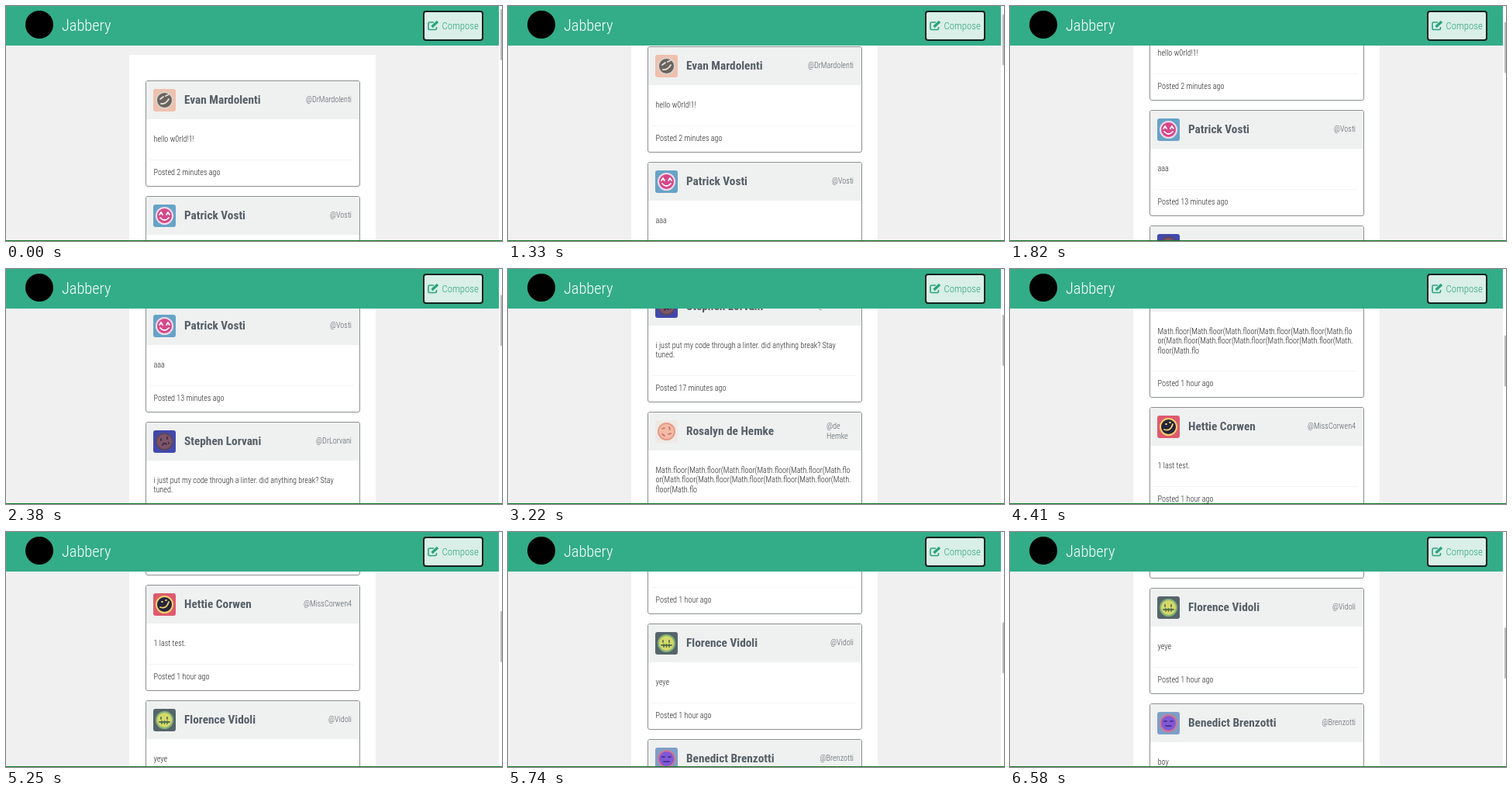
Recreate the animation shown at these times as an HTML page. Size 640 px wide and 303 px high, loop 6.79 s.

```html
<!DOCTYPE html>
<html lang="en">
<head>
<meta charset="utf-8">
<title>Jabbery</title>
<style>
  * { box-sizing: border-box; }
  html, body { margin: 0; width: 100%; height: 100%; overflow: hidden; }
  body {
    position: relative; background: #fff; color: #222;
    font: 300 10.2px/12.25px "Roboto Condensed", Roboto, sans-serif;
    font-stretch: condensed; white-space: pre;
  }
  .wide * { letter-spacing: -.055em; }
  body > *, .card > *, #bar > * { position: absolute; }
  #page { left: 0; top: 0; width: 636px; height: 302px; background: #f0f0f0; overflow: hidden; }
  #feed { position: absolute; left: 159px; top: 63px; width: 318px; height: 1300px; background: #fff; }
  .card {
    position: absolute; left: 21px; width: 277px;
    border: 1px solid #8b9092; border-radius: 3px; overflow: hidden;
  }
  .head {
    left: 0; top: 0; width: 100%; height: 49px; padding: 0 10px 0 9px;
    background: #eff0f0; color: #545f66; display: flex; align-items: center;
  }
  .head svg { width: 29px; height: 29px; margin-right: 11px; }
  .head b { font-size: 15.3px; font-weight: 700; }
  .handle { margin-left: auto; }
  .two { width: 35px; }
  .text, .time { left: 9.5px; }
  .text { top: 69px; }
  .rule { left: 4px; width: 264px; height: 1px; background: #f4f4f4; }
  #bar { left: 0; top: 0; width: 636px; height: 51px; background: #33ad87; }
  #logo { left: 25px; top: 6px; width: 36px; height: 36px; border-radius: 50%; background: #000; }
  #brand { left: 72px; top: 13px; font-size: 20.4px; line-height: 25px; color: #fff; }
  #compose {
    left: 538px; top: 6px; width: 78px; height: 39px; border: 2px solid #14211d;
    border-radius: 4px; background: #d9efe7; color: #2aa37d;
    font-size: 12.8px; line-height: 35px; padding-left: 22.5px;
  }
  #compose svg { position: absolute; left: 4px; top: 10px; }
  #thumb { left: 638px; top: 4px; width: 2px; height: 66px; border-radius: 1px; background: #b9b9b9; }
  #foot { left: 0; top: 302px; width: 640px; height: 1px; background: #0c7a22; }
</style>
</head>
<body>
<div id="page"><div id="feed"></div></div>
<div id="bar">
  <div id="logo"></div>
  <div id="brand">Jabbery</div>
  <div id="compose"><svg width="16" height="14" fill="none" stroke="#2aa37d"><path d="M8 3H2.5Q1 3 1 4.5V11Q1 12.5 2.5 12.5H10Q11.5 12.5 11.5 11V9" stroke-width="1.6"/><path d="M5.5 9L13 2" stroke-width="3.4"/></svg>Compose</div>
</div>
<div id="thumb"></div>
<div id="foot"></div>
<script>
const LOOP = 6790, STEP = 70;
const math = 'Math.floor('.repeat(5);

// name, handle, text, age, avatar [background, ring, face, ink, features]
const posts = [
  ['Evan Mardolenti', '@DrMardolenti', 'hello w0rld!1!', '2 minutes',
    ['#efc0ac', '#ddd0c8', '#69645f', '#e9ddd4', 'M9 13l4 -3M16 9l4 -2M10 19q6 1 10 -6']],
  ['Patrick Vosti', '@Vosti', 'aaa', '13 minutes',
    ['#67a3c8', '#f0dbe6', '#d6488a', '#fff', 'M8 13l2 -3l2 3M17 13l2 -3l2 3M9 17q5.5 6 11 0']],
  ['Stephen Lorvani', '@DrLorvani', 'i just put my code through a linter. did anything break? Stay\ntuned.', '17 minutes',
    ['#4149ae', '#594762', '#805466', '#352c4c', 'M10 11v2M18 9v2M12 19q2 -4 5 -1M20 16v1']],
  ['Rosalyn de Hemke', '@de\nHemke', `${math}Math.flo\nor(${math}Math.\nfloor(Math.flo`, '1 hour',
    ['#eee9e5', '#e79a88', '#f2bca4', '#cf6b70', 'M9 11l3 -1M18 9l1 3M9 18l3 2M17 18l3 -1']],
  ['Hettie Corwen', '@MissCorwen4', '1 last test.', '1 hour',
    ['#df5a6e', '#efd36a', '#25243c', '#efd36a', 'M9 18q8 3 11 -7M11 11h1M16 9h1']],
  ['Florence Vidoli', '@Vidoli', 'yeye', '1 hour',
    ['#55656b', '#83b375', '#d5d969', '#58724f', 'M10 11v2M18 11v2M8 17h13M11 16v3M14.5 16v3M18 16v3']],
  ['Benedict Brenzotti', '@Brenzotti', 'boy', '1 hour',
    ['#7d9fc9', '#d4758f', '#8058d6', '#4a358e', 'M9 12h3M17 12h3M11 18h7']]
];

const avatar = ([bg, ring, face, ink, d]) => `<svg viewBox="0 0 29 29" fill="none">
  <rect width="29" height="29" rx="3" fill="${bg}"/>
  <circle cx="14.5" cy="14.5" r="10.5" fill="${face}" stroke="${ring}" stroke-width="2"/>
  <path d="${d}" stroke="${ink}" stroke-width="1.8" stroke-linecap="round"/></svg>`;

const feed = document.getElementById('feed');
const thumb = document.getElementById('thumb');
let cardTop = 33, html = '';
for (const [name, handle, text, age, look] of posts) {
  const extra = 12 * (text.split('\n').length - 1);
  const two = handle.includes('\n') ? ' two' : '';
  html += `<div class="card" style="top:${cardTop}px;height:${137 + extra}px">` +
    `<div class="head">${avatar(look)}<b>${name}</b><span class="handle${two}">${handle}</span></div>` +
    `<div class="text">${text}</div>` +
    `<div class="rule" style="top:${101 + extra}px"></div>` +
    `<div class="time" style="top:${112 + extra}px">Posted ${age} ago</div></div>`;
  cardTop += 149 + extra;
}
feed.innerHTML = html;

// Tighten the letters where no condensed face is available
const ctx = document.createElement('canvas').getContext('2d');
const measure = font => (ctx.font = font, ctx.measureText('Posted minutes').width);
if (measure('condensed 20px "Roboto Condensed", Roboto') > .95 * measure('20px Roboto'))
  document.body.className = 'wide';

// [time, scroll offset], joined by smooth curves
const keys = [[980, 0], [1330, 44], [2380, 197], [3220, 371], [4410, 550], [5250, 660], [6130, 805]];
const last = keys.length - 1;
const slope = i => i < 1 || i >= last ? 0 :
  (keys[i + 1][1] - keys[i - 1][1]) / (keys[i + 1][0] - keys[i - 1][0]);

function scrollAt(t) {
  if (t <= keys[0][0]) return 0;
  if (t >= keys[last][0]) return keys[last][1];
  const i = keys.findIndex(k => k[0] > t) - 1;
  const [t0, a] = keys[i], [t1, b] = keys[i + 1];
  const span = t1 - t0, u = (t - t0) / span, v = 1 - u;
  return a * v * v * (1 + 2 * u) + b * u * u * (3 - 2 * u) +
    span * u * v * (slope(i) * v - slope(i + 1) * u);
}

function draw() {
  const t = performance.now() % LOOP;
  const y = Math.round(scrollAt(Math.floor(t / STEP) * STEP));
  feed.style.transform = `translateY(${-y}px)`;
  thumb.style.transform = `translateY(${y * .148}px)`;
  requestAnimationFrame(draw);
}
draw();
</script>
</body>
</html>
```
